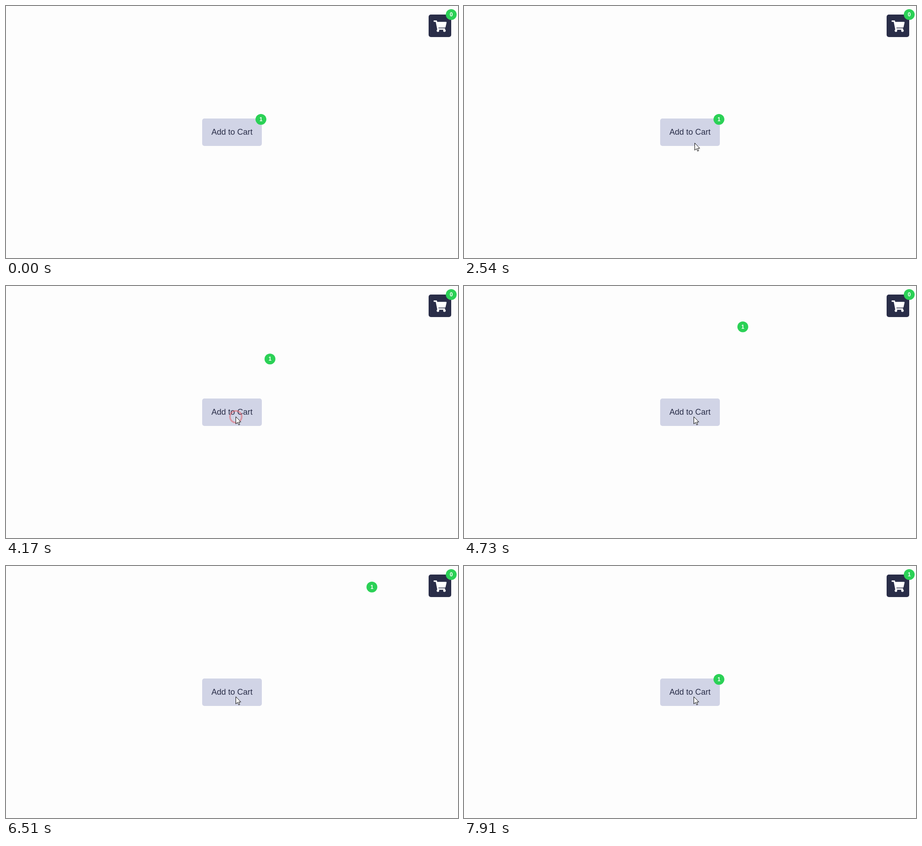
Animation, 1000 px wide and 560 px high, one loop 8000 ms. Source, as an HTML page:

```html
<!DOCTYPE html>
<html lang="en">
<head>
<meta charset="utf-8">
<title>Add to Cart</title>
<style>
  html, body { margin: 0; width: 100%; height: 100%; overflow: hidden; background: #fdfdfd; }
  svg { display: block; width: 1000px; height: 560px; }
  text { font-family: "Liberation Sans", Arial, sans-serif; text-anchor: middle; }
  .label { font-size: 18px; fill: #292d48; }
  .badge circle { fill: #2bd156; }
  .badge text { font-size: 12px; font-weight: bold; fill: #fff; }
  #ring { fill: none; stroke: #e0606a; stroke-width: 3.5; }
  #cursor path { fill: #fff; stroke: #000; stroke-width: 1; }
</style>
</head>
<body>
<svg viewBox="0 0 1000 560">
  <g id="cart">
    <rect x="935" y="19" width="50" height="50" rx="5" fill="#292d48"/>
    <g transform="translate(946 32) scale(.05)" fill="#fff">
      <path d="M0 24Q0 0 24 0H126Q146 0 150 19L232 416H164L94 64H24Q0 64 0 40Z"/>
      <path d="M140 64H552Q580 64 575 94L528 302Q523 320 504 320H200Z"/>
      <path d="M160 352H487Q515 352 510 381L504 416H164Z"/>
      <circle cx="192" cy="456" r="56"/>
      <circle cx="480" cy="456" r="56"/>
    </g>
    <g class="badge" transform="translate(985 19)">
      <circle r="12"/><text id="count" y="4">0</text>
    </g>
  </g>
  <rect x="434" y="250" width="132" height="61" rx="5" fill="#d1d4e6"/>
  <text class="label" x="500" y="286">Add to Cart</text>
  <g id="item" class="badge"><circle r="12"/><text y="4">1</text></g>
  <circle id="ring" cx="508.5" cy="290.5"/>
  <g id="cursor"><path d="M.5 .5V16.5L4.3 13 6.8 18.6 9.2 17.6 6.8 12.2H11.6Z"/></g>
</svg>
<script>
const LOOP = 8000, LANDED = 6720, SHAKE_TIME = 1120, RING_MAX = 29;
const $ = id => document.getElementById(id);
const cart = $('cart'), count = $('count'), item = $('item'), ring = $('ring'), cursor = $('cursor');

// CSS-style cubic-bezier easing, solved by bisection
function bezier(x1, y1, x2, y2) {
  const at = (s, a, b) => 3 * (1 - s) ** 2 * s * a + 3 * (1 - s) * s * s * b + s ** 3;
  return x => {
    if (x <= 0 || x >= 1) return x <= 0 ? 0 : 1;
    let lo = 0, hi = 1;
    for (let i = 0; i < 30; i++) {
      const mid = (lo + hi) / 2;
      if (at(mid, x1, x2) < x) lo = mid; else hi = mid;
    }
    return at(lo, y1, y2);
  };
}
const easeX = bezier(1, .44, .84, .165);
const easeY = bezier(.165, .84, .44, 1);
const easeInOut = bezier(.42, 0, .58, 1);

// Value of column `col` at time t in rows of [time, ...values]
function track(rows, t, col = 1, ease = u => u) {
  if (t <= rows[0][0]) return rows[0][col];
  for (let i = 1; i < rows.length; i++) {
    const a = rows[i - 1], b = rows[i];
    if (t < b[0]) return a[col] + (b[col] - a[col]) * ease((t - a[0]) / (b[0] - a[0]));
  }
  return rows[rows.length - 1][col];
}

const flight = [[3840, 0], [4170, .117], [4730, .32], [5850, .722], [6510, .931], [LANDED, 1]];
const shake = [[0, 0], [.25, 6], [.5, -4], [.75, 2], [1, 0]];
const pointer = [[970, 613, 552], [1350, 557, 434], [1740, 521, 365], [2150, 514, 331],
  [2540, 510, 304], [2580, 510, 298], [2820, 508, 290]];
// [start, end, radius at start, radius at end]
const rings = [[3490, 3610, RING_MAX, 6], [3750, 4690, 0, RING_MAX], [7690, 7810, RING_MAX, 6]];

const move = (el, x, y) => el.setAttribute('transform', `translate(${x} ${y})`);

function draw(t) {
  const landed = t >= LANDED;
  const p = landed ? 0 : track(flight, t);
  move(item, 564 + 395 * easeX(p), 252 - 205.5 * easeY(p));
  move(cart, track(shake, (t - LANDED) / SHAKE_TIME, 1, easeInOut), 0);
  count.textContent = landed ? 1 : 0;

  cursor.style.display = t < 970 ? 'none' : '';
  move(cursor, Math.round(track(pointer, t, 1)), Math.round(track(pointer, t, 2)));

  const click = rings.find(([start, end]) => t >= start && t < end);
  ring.style.display = click ? '' : 'none';
  if (click) {
    const [start, end, from, to] = click;
    const r = from + (to - from) * (t - start) / (end - start);
    ring.setAttribute('r', r);
    ring.setAttribute('opacity', .8 - .6 * r / RING_MAX);
  }
}

const begin = performance.now();
function tick() {
  draw((performance.now() - begin) % LOOP);
  requestAnimationFrame(tick);
}
draw(0);
requestAnimationFrame(tick);
</script>
</body>
</html>
```
